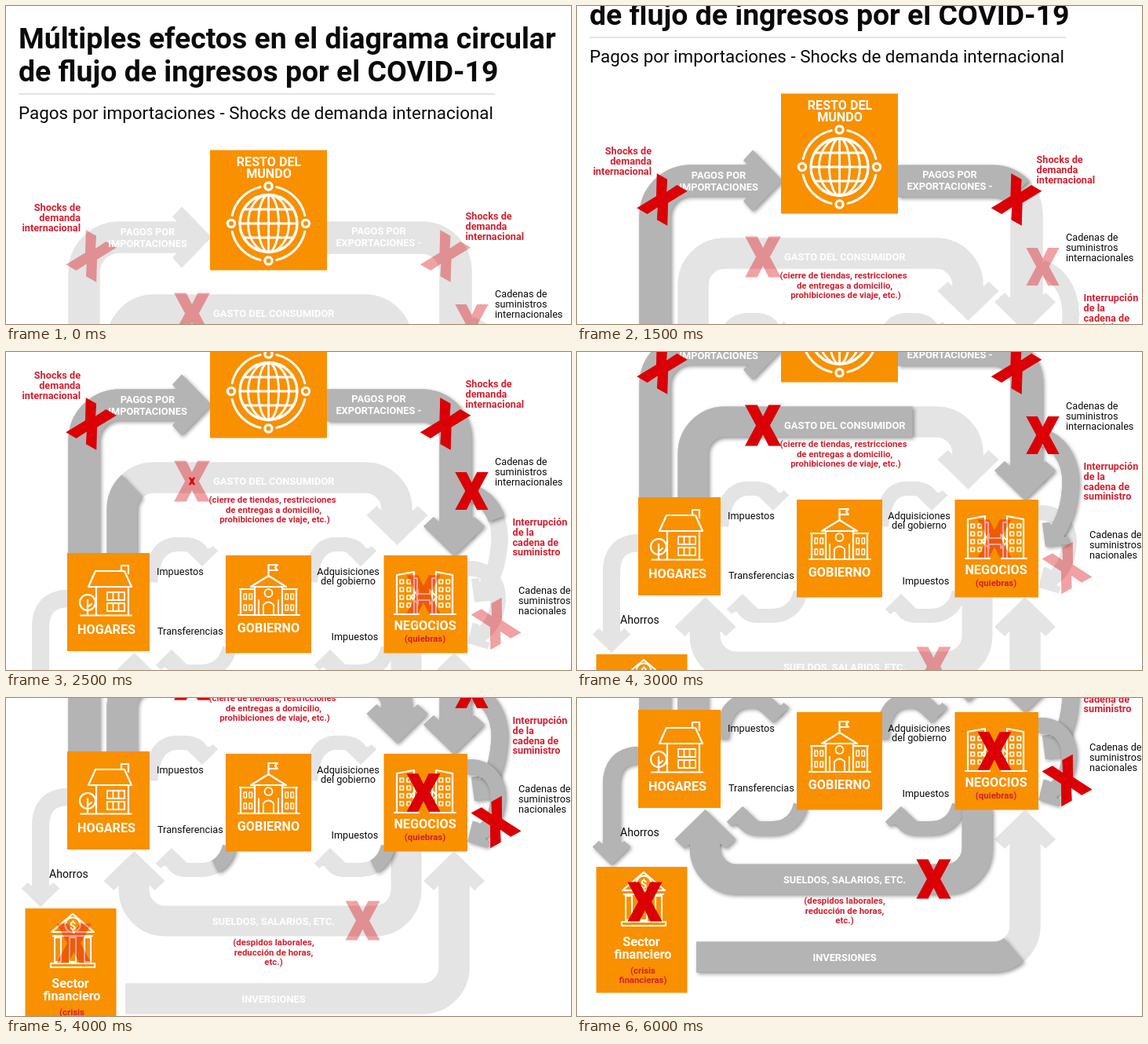
An HTML page with a canvas for the animation above (6.25 s loop, 720 px wide and 405 px high).

```html
<!DOCTYPE html>
<html lang="es">
<head>
<meta charset="utf-8">
<style>
html, body { margin: 0; width: 100%; height: 100%; overflow: hidden; background: #fff; }
canvas { display: block; width: 720px; height: 405px; }
</style>
</head>
<body>
<canvas id="stage"></canvas>
<script>
const W = 720, H = 405, LOOP = 6250, STEP = 250;
const ORANGE = '#f89000', RED = '#d2202f', CROSS = '#da0006', DARK = '#b4b4b4', PALE = '#e4e4e4';
const cv = document.getElementById('stage');
const dpr = window.devicePixelRatio || 1;
cv.width = W * dpr;
cv.height = H * dpr;
const g = cv.getContext('2d');

const clamp = v => Math.max(0, Math.min(1, v));
const ramp = (t, a, b) => clamp((t - a) / (b - a));

// seconds, scroll, speed
const KEYS = [[1, 0, 133], [1.5, 72, 152], [2.5, 227, 150], [3, 298, 134], [4, 415, 94], [5, 468, 10]];
function scrollAt(ms) {
  const t = ms / 1000;
  if (t <= 1) return 0;
  if (t >= 5) return 468;
  const i = KEYS.findIndex(k => k[0] > t) - 1;
  const [t0, y0, v0] = KEYS[i], [t1, y1, v1] = KEYS[i + 1];
  const d = t1 - t0, u = (t - t0) / d, u2 = u * u, u3 = u2 * u;
  return (2 * u3 - 3 * u2 + 1) * y0 + (u3 - 2 * u2 + u) * d * v0
    + (3 * u2 - 2 * u3) * y1 + (u3 - u2) * d * v1;
}

// path, width, tip x, tip y, heading, head scale, start, end
const ARROWS = [
  ['M99.5 486V339.5A45 45 0 0 1 144.5 294.5H236', 40, 262, 294.5, 0, 1, 100, 1000],
  ['M409 295H530A43 43 0 0 1 573 338V461', 41, 571, 487, 90, 1, 1000, 2000],
  ['M148 486V427A40 40 0 0 1 188 387H458A40 40 0 0 1 498 427V447', 39, 498.5, 473, 90, 1, 2330, 3210],
  ['M592 406C620 415 633 445 628 478C626 500 620 516 608 532', 21, 597, 546, 128, .56, 2250, 3000],
  ['M586 503C613 500 629 520 627 545C625 570 613 583 600 590', 19, 588, 598, 150, .5, 3000, 3750],
  ['M184 520C186 490 197 472 218 472H226C241 472 250 478 250 488', 18, 250, 500, 90, .52, 4000, 4750],
  ['M388 520C390 490 400 472 420 472H428C443 472 452 478 452 488', 18, 452, 500, 90, .52, 4000, 4750],
  ['M285 604C280 625 265 634 248 634H230C220 634 211 629 211 618', 18, 211, 606, -90, .52, 3750, 4500],
  ['M487 604C482 625 467 634 450 634H432C422 634 413 629 413 618', 18, 413, 606, -90, .52, 3750, 4500],
  ['M80 541C54 541 44 556 44 578V664', 22, 44, 681, 90, .62, 4000, 4900],
  ['M510 608V659A40 40 0 0 1 470 699H203A40 40 0 0 1 163 659V636', 38.5, 163.5, 610, -90, 1, 4800, 5750],
  ['M152 798H530A40 40 0 0 0 571 758V636', 39, 571, 610, -90, 1, 5250, 6290]
].map(([d, w, x, y, deg, k, a, b]) => {
  const el = document.createElementNS('http://www.w3.org/2000/svg', 'path');
  el.setAttribute('d', d);
  return { path: new Path2D(d), len: el.getTotalLength(), w, x, y, rot: deg * Math.PI / 180, k, a, b };
});

const poly = s => new Path2D('M' + s + 'Z');
const HEAD = poly('0 0L-38 -39L-50 -26L-44 -20V20L-50 26L-38 39');
const XMARK = poly('-22 -25H-7L0 -11L7 -25H22L8.5 0L22 25H7L0 11L-7 25H-22L-8.5 0');

// x, y, degrees, size, start, end
const CROSSES = [
  [108.5, 318.5, 30, 1.02, 0, 500],
  [560, 318.5, 30, 1.02, 1000, 1450],
  [237, 391.5, 0, 1.04, 2420, 2850],
  [593.5, 404, 0, .96, 2000, 2450],
  [624.5, 573, -29, 1.02, 3250, 3750],
  [532, 535.5, 0, .97, 3250, 3750],
  [454.5, 698.5, 0, 1, 4600, 5100],
  [86.5, 727.5, 0, 1, 4600, 5100]
];

function head(a) {
  g.save();
  g.translate(a.x, a.y);
  g.rotate(a.rot);
  g.scale(a.k, a.k);
  g.fill(HEAD);
  g.restore();
}

function arrow(a, p, color, shadow) {
  if (p <= 0) return;
  g.save();
  g.strokeStyle = g.fillStyle = color;
  g.lineWidth = a.w;
  if (p < 1) g.setLineDash([a.len * p, 9999]);
  if (shadow) {
    g.shadowColor = 'rgba(0,0,0,.4)';
    g.shadowBlur = 5 * dpr;
    g.shadowOffsetX = g.shadowOffsetY = 2 * dpr;
  }
  g.stroke(a.path);
  if (p >= 1) {
    head(a);
    g.shadowColor = 'transparent';
    g.stroke(a.path);
  }
  g.restore();
}

function cross([x, y, deg, size], k, alpha) {
  if (k <= 0) return;
  g.save();
  g.translate(x, y);
  g.rotate(deg * Math.PI / 180);
  g.scale(size * k, size * k);
  g.globalAlpha = alpha;
  g.fillStyle = CROSS;
  g.fill(XMARK);
  g.restore();
}

function text(lines, x, y, size, opt = {}) {
  g.font = `${opt.bold ? 700 : 400} ${size}px Roboto, sans-serif`;
  g.fillStyle = opt.color || '#0a0a0a';
  g.textAlign = opt.align || 'left';
  lines.split('|').forEach((s, i) => g.fillText(s, x, y + i * (opt.lh || 12.8)));
}
const red = { bold: 1, color: RED };
const redMid = { bold: 1, color: RED, align: 'center', lh: 12.5 };
const white = { bold: 1, color: '#fff', align: 'center', lh: 15 };

function line(d, w = 2.2) {
  g.lineWidth = w;
  g.stroke(new Path2D(d));
}
function ring(x, y, r, w = 2.2, a = 0, b = 7) {
  g.lineWidth = w;
  g.beginPath();
  g.arc(x, y, r, a, Math.min(b, a + Math.PI * 2));
  g.stroke();
}
function box(x, y, w, h) {
  g.fillStyle = ORANGE;
  g.fillRect(x, y, w, h);
}
function frame(x, y, w, h, lw = 1.8) {
  g.lineWidth = lw;
  g.strokeRect(x, y, w, h);
}

function globe(x, y) {
  ring(x, y, 36.5, 3.4);
  for (const rx of [13, 26]) {
    g.lineWidth = 2.8;
    g.beginPath();
    g.ellipse(x, y, rx, 36.5, 0, 0, 7);
    g.stroke();
  }
  line(`M${x} ${y - 36}v72M${x - 36} ${y}h72M${x - 31} ${y - 18}h62M${x - 31} ${y + 18}h62`, 2.8);
  for (let i = 0; i < 4; i++) {
    const a = i * Math.PI / 2;
    ring(x, y, 47.5, 3, a + .22, a + Math.PI / 2 - .22);
    ring(x + 47.5 * Math.cos(a), y + 47.5 * Math.sin(a), 4.6, 3.2);
  }
}

function house() {
  line('M114 506H151L160 526H105ZM147 506V499H156V509M115 527V562M156 527V562M95 562.5H160');
  frame(129, 533, 22, 10);
  frame(129, 547, 22, 10);
  line('M136.5 533v10M143.5 533v10M136.5 547v10M143.5 547v10', 1.8);
  ring(104, 546, 10);
  line('M104 543V562M104 552l5 -4');
}

function palace() {
  line('M334.5 513V498H346L343 501.500L346 505H335M312 526L334.5 512L357 526ZM317 527V561M352 527V561M298 529H317M352 529H371M299 529V561M370 529V561M296 562H374');
  ring(334.5, 534, 5, 1.8);
  line('M328 561V549Q334.5 542 341 549V561M322 543V561M347 543V561', 1.8);
  for (const x of [303, 310, 356, 363])
    for (const y of [535, 549]) frame(x, y, 3.5, 7, 1.5);
}

function offices() {
  line('M498 561V511L520 507V561M520 515H524V561M543 561V515H548M548 561V507L569 511V561M495 561H526M541 561H573');
  for (const x of [502, 511, 552, 561])
    for (let y = 517; y < 555; y += 10) frame(x, y, 4.5, 5, 1.6);
  line('M516 539L525 530V535H540V530L549 539L540 548V543H525V548Z', 1.8);
}

function bank() {
  line('M58 713L85 690L112 713ZM60 718H110M57 753H113V758H57Z');
  g.fillStyle = ORANGE;
  g.beginPath();
  g.arc(85, 704, 9.5, 0, 7);
  g.fill();
  ring(85, 704, 9.5);
  for (const x of [62, 81, 100]) frame(x, 720, 8, 31, 2);
  text('$', 85, 709.5, 15, white);
}

function boxes() {
  g.strokeStyle = '#fff';
  g.lineJoin = g.lineCap = 'round';
  box(260, 183.500, 149, 153);
  globe(334.5, 277);
  box(78, 483, 105, 125);
  house();
  box(280, 486, 109, 124.5);
  palace();
  box(481.5, 486, 106.5, 124.5);
  offices();
  box(24.5, 683, 116, 160.5);
  bank();
  g.lineJoin = 'miter';
  g.lineCap = 'butt';
  text('RESTO DEL|MUNDO', 335, 204, 16.1, white);
  text('HOGARES', 128, 585.5, 16.2, white);
  text('GOBIERNO', 334.5, 584, 16.2, white);
  text('NEGOCIOS', 534, 580.5, 16.2, white);
  text('(quiebras)', 534, 596, 11.4, redMid);
  text('Sector', 82, 784, 16.2, white);
  text('financiero', 84, 800, 16.2, white);
  text('(crisis|financieras)', 84, 818.5, 11.4, redMid);
}

function labels() {
  const left = { bold: 1, color: '#fff' };
  text('Múltiples efectos en el diagrama circular|de flujo de ingresos por el COVID-19', 16, 54, 37.4, { bold: 1, lh: 41.5 });
  g.fillStyle = '#c8c8c8';
  g.fillRect(16, 111.5, 607, 1);
  text('Pagos por importaciones - Shocks de demanda internacional', 16, 144, 22.4);
  text('Shocks de|demanda|internacional', 95, 261, 12.7, { bold: 1, color: RED, align: 'right' });
  text('Shocks de|demanda|internacional', 585.5, 272, 12.7, red);
  text('PAGOS POR|IMPORTACIONES', 180.5, 292, 12.8, white);
  text('PAGOS POR|EXPORTACIONES -', 475, 290.5, 12.8, white);
  text('Cadenas de|suministros|internacionales', 623, 371, 12.7);
  text('GASTO DEL CONSUMIDOR', 264, 396, 12.9, left);
  text('(cierre de tiendas, restricciones', 339.5, 419, 11.4, redMid);
  text('de entregas a domicilio,', 341, 431.5, 11.4, redMid);
  text('prohibiciones de viaje, etc.)', 342.5, 444, 11.4, redMid);
  text('Interrupción|de la|cadena de|suministro', 645.5, 448, 12.7, red);
  text('Cadenas de|suministros|nacionales', 653, 535, 12.7);
  text('Impuestos', 192, 510.5, 12.7);
  text('Adquisiciones|del gobierno', 436, 510.5, 12.7, { align: 'center' });
  text('Transferencias', 193, 586.5, 12.7);
  text('Impuestos', 414.5, 593.5, 12.7);
  text('Ahorros', 55, 643.5, 14.1);
  text('SUELDOS, SALARIOS, ETC.', 263, 704, 12.8, left);
  text('(despidos laborales,|reducción de horas,|etc.)', 341, 730, 11.4, redMid);
  text('INVERSIONES', 300.5, 802.5, 12.8, left);
}

function draw(t) {
  g.setTransform(dpr, 0, 0, dpr, 0, 0);
  g.fillStyle = '#fff';
  g.fillRect(0, 0, W, H);
  g.translate(0, -Math.round(scrollAt(t)));
  ARROWS.forEach(a => arrow(a, 1, PALE));
  ARROWS.forEach(a => arrow(a, ramp(t, a.a, a.b), DARK, true));
  boxes();
  CROSSES.forEach(c => cross(c, 1, .37));
  labels();
  CROSSES.forEach(c => cross(c, ramp(t, c[4], c[5]), 1));
}

const start = performance.now();
function tick() {
  const t = (performance.now() - start) % LOOP;
  draw(Math.floor(t / STEP) * STEP);
  requestAnimationFrame(tick);
}
tick();
</script>
</body>
</html>
```
